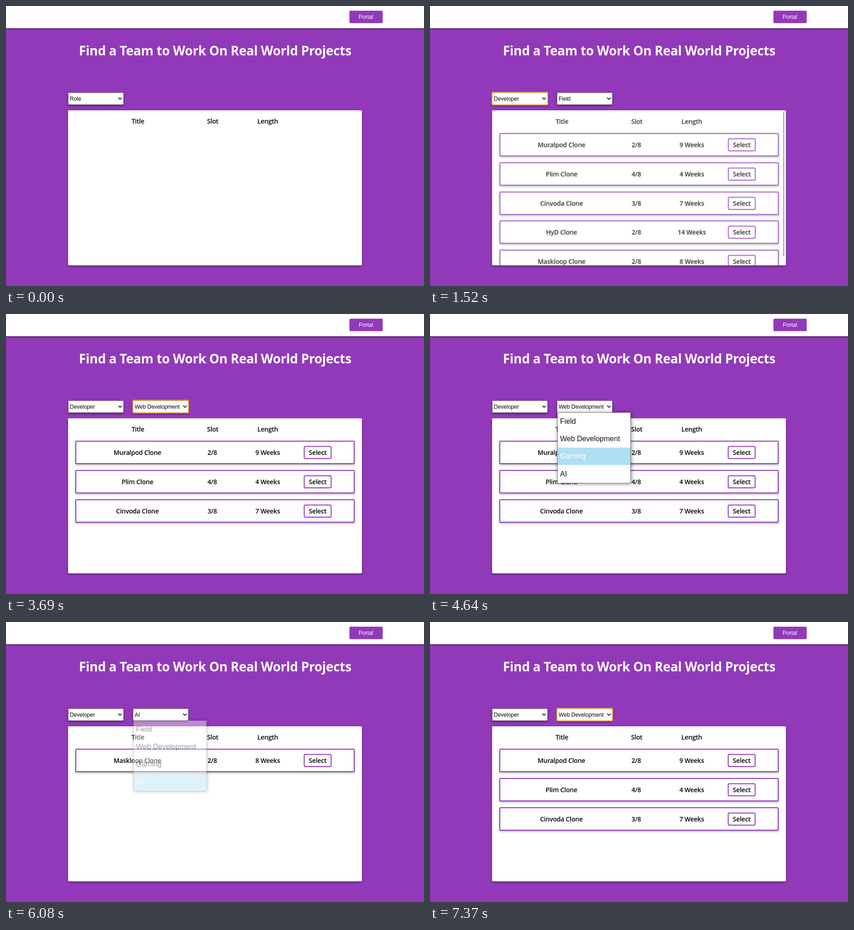
An HTML page that plays this animation: 916 px wide and 612 px high, repeating every 8 s.

```html
<!DOCTYPE html>
<html lang="en">
<head>
<meta charset="utf-8">
<title>Team finder</title>
<style>
  html, body { margin: 0; width: 100%; height: 100%; overflow: hidden; background: #9239ba; }
  svg { display: block; }
  text { font: 600 14px "Open Sans", "Noto Sans", sans-serif; letter-spacing: -.22px; text-anchor: middle; }
  .title { font-size: 28px; font-weight: 700; letter-spacing: -.32px; fill: #fff; }
  .ui { font: 12px "Liberation Sans", Arial, sans-serif; letter-spacing: 0; text-anchor: start; }
  .option { font-size: 16px; }
  .bar { filter: drop-shadow(0 2px 2px rgba(0,0,0,.45)); }
  .row { filter: drop-shadow(0 2px 2px rgba(0,0,0,.35)); }
  .popup { filter: drop-shadow(1px 1px 4px rgba(0,0,0,.5)); }
  .line { fill: #fff; stroke: #9239ba; stroke-width: 2; }
</style>
</head>
<body>
<svg width="916" height="612" viewBox="0 0 916 612">
  <clipPath id="card"><rect x="136" y="228" width="644" height="339" rx="2"/></clipPath>
  <rect width="916" height="612" fill="#9239ba"/>
  <rect class="bar" x="-9" y="-9" width="934" height="57.5" fill="#fff"/>
  <rect x="752.5" y="10.3" width="73" height="27.2" rx="2.5" fill="#9239ba"/>
  <text class="ui" x="773" y="28" fill="#fff">Portal</text>
  <text class="title" x="458.3" y="108">Find a Team to Work On Real World Projects</text>
  <rect class="bar" x="136" y="228" width="644" height="339" rx="2" fill="#fff"/>
  <g id="scene"></g>
</svg>
<script>
const LOOP = 8000;
const menus = [
  { x: 136, popupX: 134.5, textX: 137.6, options: ['Role', 'Designer', 'Developer'] },
  { x: 278, popupX: 279.5, textX: 285, options: ['Field', 'Web Development', 'Gaming', 'AI'] }
];
// title, slots, length, field index
const projects = [
  ['Muralpod Clone', '2/8', '9 Weeks', 1],
  ['Plim Clone', '4/8', '4 Weeks', 1],
  ['Cinvoda Clone', '3/8', '7 Weeks', 1],
  ['HyD Clone', '2/8', '14 Weeks', 2],
  ['Maskloop Clone', '2/8', '8 Weeks', 3]
];
// Each step changes part of the state; open and focus are menu indexes, -1 for none.
const steps = [
  [0, { role: 0, field: 0, focus: -1, open: -1, hover: 0, alpha: 1 }],
  [540, { open: 0, alpha: .35 }],
  [605, { alpha: .7 }],
  [670, { alpha: 1 }],
  [1330, { hover: 2 }],
  [1470, { role: 2, alpha: .4 }],
  [1520, { open: -1, focus: 0 }],
  [3020, { open: 1, hover: 0, alpha: 1 }],
  [3480, { hover: 1 }],
  [3630, { field: 1, alpha: .4 }],
  [3690, { open: -1, focus: 1 }],
  [4180, { open: 1, alpha: .6 }],
  [4230, { alpha: 1 }],
  [4640, { hover: 2 }],
  [4790, { alpha: .6 }],
  [4835, { field: 2, alpha: .3 }],
  [4880, { open: -1 }],
  [5490, { open: 1, alpha: 1 }],
  [6000, { hover: 3 }],
  [6070, { field: 3, alpha: .4 }],
  [6140, { open: -1 }],
  [6700, { open: 1, alpha: 1 }],
  [7180, { hover: 1 }],
  [7275, { field: 1, alpha: .4 }],
  [7370, { open: -1 }]
];

const label = (x, y, s, attrs = '') => `<text x="${x}" y="${y}" ${attrs}>${s}</text>`;
const box = (x, y, w, h, attrs) => `<rect x="${x}" y="${y}" width="${w}" height="${h}" ${attrs}/>`;

function select({ x, options }, value, focused) {
  return `<g class="bar">${box(x + .5, 189.5, 121, 26, 'rx="1.5" fill="#fff" stroke="#807488"')}</g>`
    + (focused ? box(x, 188.5, 122, 27.5, 'rx="2" fill="none" stroke="#e9a43c" stroke-width="2"') : '')
    + label(x + 4, 207, options[value], 'class="ui"')
    + `<path d="M${x + 110.2} 200.3l3.8 3.8 3.8-3.8" fill="none" stroke="#111" stroke-width="1.7"/>`;
}

function popup({ popupX, textX, options }, hover, alpha) {
  const rowTop = i => Math.round(216 + i * 38.2);
  const rows = options.map((name, i) => {
    const on = i === hover;
    return (on ? box(popupX + .5, rowTop(i), 159, 38, 'fill="#ade0f5"') : '')
      + label(textX, rowTop(i) + 24, name, `class="ui option" fill="${on ? '#fff' : '#111'}"`);
  });
  const height = rowTop(options.length) - 215;
  return `<g opacity="${alpha}"><g class="popup">`
    + box(popupX, 215.5, 160, height, 'fill="#fff" stroke="#85808a"')
    + `</g>${rows.join('')}</g>`;
}

function row([title, slot, length], i) {
  const y = Math.round(278 + i * 63.8);
  return `<g class="row">${box(153, y, 610, 49, 'class="line" rx="1"')}</g>`
    + label(288, y + 30, title) + label(452, y + 30, slot) + label(573.5, y + 30, length)
    + box(653.5, y + 11.5, 59, 26.5, 'class="line" rx="2.5"') + label(683, y + 30, 'Select');
}

function scene({ role, field, focus, open, hover, alpha }) {
  const shown = role ? projects.filter(p => !field || p[3] === field) : [];
  const scrolls = shown.length > 4;
  const headings = label(289, 257, 'Title') + label(453, 257, 'Slot') + label(573.5, 257, 'Length');
  return select(menus[0], role, focus === 0 && open < 0)
    + (role ? select(menus[1], field, focus === 1 && open < 0) : '')
    + `<g clip-path="url(#card)"><g ${scrolls ? 'opacity=".82" transform="translate(.3 .6)"' : ''}>`
    + headings + shown.map(row).join('') + '</g>'
    + (scrolls ? box(774, 231, 2.5, 316, 'rx="1" fill="#a9a6ab"') : '') + '</g>'
    + (open < 0 ? '' : popup(menus[open], hover, alpha));
}

const layer = document.getElementById('scene');
let current = -1;
function draw() {
  const t = performance.now() % LOOP;
  const past = steps.filter(s => s[0] <= t);
  if (past.length !== current) {
    current = past.length;
    layer.innerHTML = scene(Object.assign({}, ...past.map(s => s[1])));
  }
  requestAnimationFrame(draw);
}
draw();
</script>
</body>
</html>
```
